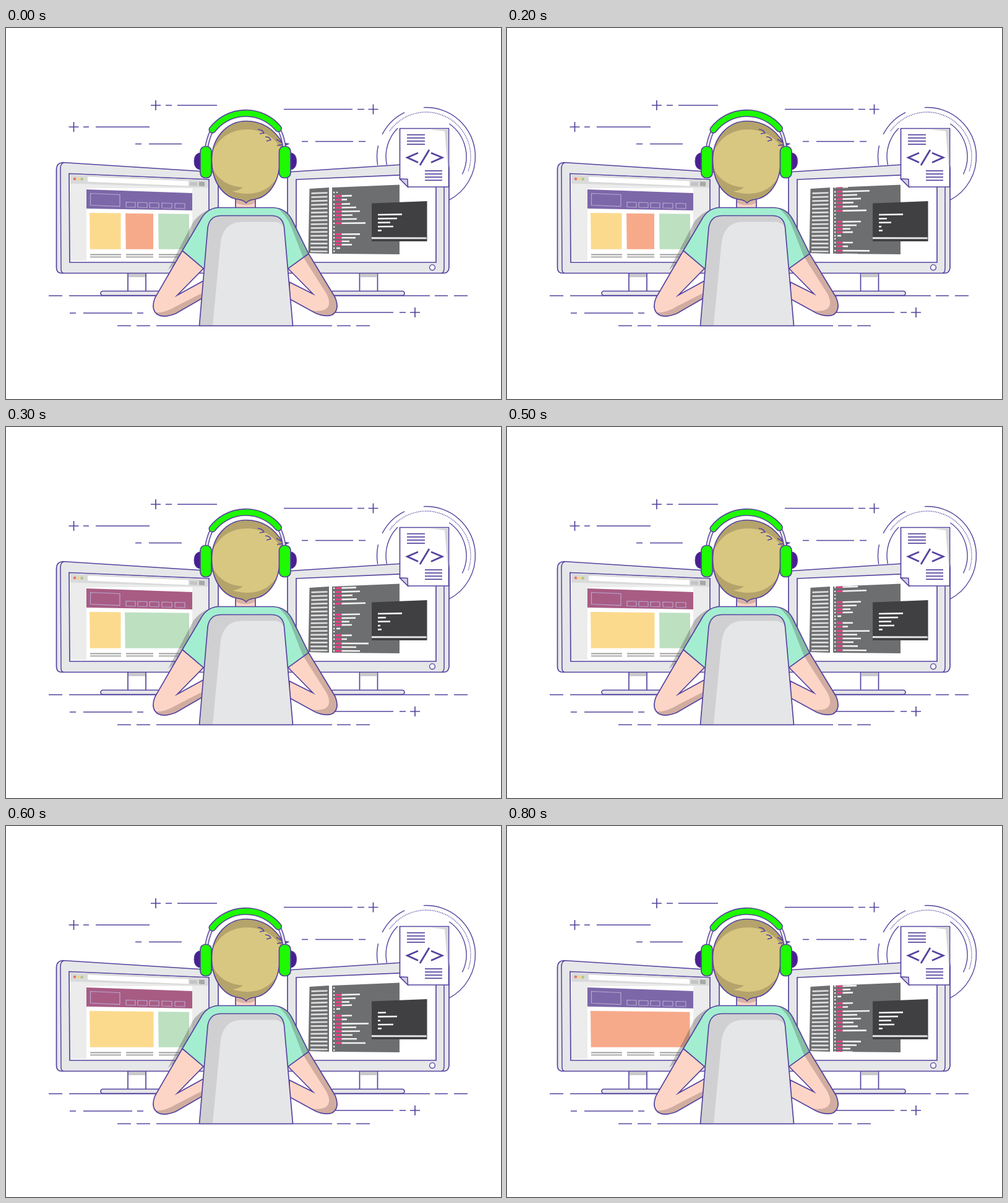
Recreate the animation shown at these times as an HTML page with a canvas. Size 800 by 600 pixels, loop 0.9 s.

```html
<!DOCTYPE html>
<html lang="en">
<head>
<meta charset="utf-8">
<title>Coder at work</title>
<style>
html, body { margin: 0; width: 100%; height: 100%; overflow: hidden; background: #fff; }
canvas { display: block; }
</style>
</head>
<body>
<canvas id="stage" width="800" height="600"></canvas>
<script>
const ctx = document.getElementById('stage').getContext('2d');
const INK = '#56439e', METAL = '#e6e7e9', SKIN = '#fdd5c7', SKIN_DARK = '#d0ada0';
const GREEN = '#1dfa02', PURPLE = '#4b1f91';
const STEP = 100, STEPS = 9;

function shape(d, fill, stroke, width = 1.7) {
  const p = new Path2D(d);
  if (fill) { ctx.fillStyle = fill; ctx.fill(p); }
  if (stroke) { ctx.strokeStyle = stroke; ctx.lineWidth = width; ctx.stroke(p); }
}

function box(x, y, w, h, r, fill, stroke, width = 1.7) {
  ctx.beginPath();
  ctx.roundRect(x, y, w, h, r);
  if (fill) { ctx.fillStyle = fill; ctx.fill(); }
  if (stroke) { ctx.strokeStyle = stroke; ctx.lineWidth = width; ctx.stroke(); }
}

function disc(x, y, r, fill, stroke) {
  box(x - r, y - r, 2 * r, 2 * r, r, fill, stroke, 1.4);
}

// Fills an outline, shades part of it, then strokes it.
function shaded(outline, fill, part, partFill) {
  shape(outline, fill);
  ctx.save();
  ctx.clip(new Path2D(outline));
  shape(part, partFill);
  ctx.restore();
  shape(outline, null, INK);
}

// Horizontal dashes on one level, given as start and end pairs.
function dashes(y, ends, color = INK, width = 1.7) {
  ctx.strokeStyle = color;
  ctx.lineWidth = width;
  ctx.beginPath();
  for (let i = 0; i < ends.length; i += 2) {
    ctx.moveTo(ends[i], y);
    ctx.lineTo(ends[i + 1], y);
  }
  ctx.stroke();
}

function plus(x, y) {
  shape(`M${x - 8} ${y}h16M${x} ${y - 8}v16`, null, INK);
}

function arc(r, from, to, dash = []) {
  ctx.setLineDash(dash);
  ctx.strokeStyle = INK;
  ctx.lineWidth = 1.4;
  ctx.beginPath();
  ctx.arc(679, 208, r, from * Math.PI / 180, to * Math.PI / 180);
  ctx.stroke();
  ctx.setLineDash([]);
}

function backdrop() {
  plus(109.5, 160);
  dashes(160, [125, 134, 145, 232]);
  plus(242, 125);
  dashes(125, [258, 268, 277, 341]);
  dashes(187.5, [209, 219, 231, 284]);
  dashes(131.5, [449, 560, 568, 579]);
  plus(593.5, 131.5);
  dashes(183.5, [478, 488, 500, 561, 570, 581]);
  dashes(433, [69, 91, 102, 245, 530, 685, 693, 714, 724, 746]);
  dashes(461, [103, 113, 125, 204, 212, 222]);
  dashes(460, [530, 626, 636, 646]);
  plus(661, 460);
  dashes(481.5, [180, 202, 211, 233, 243, 527, 535, 557, 566, 588]);
  arc(79.5, -93, 63);
  arc(79.5, 207, 244);
  arc(79.5, 170, 193);
  arc(72, 215, 380, [1.3, 1.5]);
  arc(65, 168, 225);
  arc(65, -55, 26);
}

function stand(x, baseX, baseW) {
  box(x, 390, 29, 36, 0, '#fff', INK);
  box(x + 1, 396, 27, 7, 0, '#c9c9cc');
  box(baseX, 425.5, baseW, 7, 3.5, METAL, INK);
}

const PAGES = [
  [[135, 185.5, '#fcda8d'], [193, 238, '#f7aa8a'], [246, 296, '#bde0c1']],
  [[135, 185.5, '#fcda8d'], [192, 296, '#bde0c1']],
  [[135, 238.5, '#fcda8d'], [246, 296, '#bde0c1']],
  [[135, 295.5, '#f7aa8a']]
];

function leftMonitor(step) {
  stand(197, 153, 100);
  shape('M92 217.5L343 233.500V396.500H89Q82 396 81.5 388V228Q82 218 92 217.5Z', METAL, INK);
  shape('M93 218Q88 219 88 228L89 390Q89 396 93 396.500', null, INK, 1.5);
  shape('M102 235.500L328 245V379H103Z', '#fff', INK);
  shape('M104 237L327 246V376.500H104Z', '#ebeceb');
  shape('M130 259H301V376.500H130Z', '#fff');
  shape('M104 237L327 246V258.500L104 251.500Z', '#d9dada');
  shape('M132 240.500L295 247.500V255.500L132 248.500Z', '#fff');
  shape('M297 249l12 .4v6l-12-.4Z', '#c3c4c4');
  shape('M312 248.500l9 .4v7l-9-.4Z', '#a6a7a7');
  ['#e87372', '#f7d67f', '#b2c77c'].forEach((c, i) => disc(111 + i * 5.8, 244 + i * .2, 2.3, c));

  const page = Math.floor((step - 1) / 2);
  const layout = PAGES[Math.max(0, page)];
  const header = page === 1 || page === 2 ? '#a85c84' : '#7c67a9';
  shape('M130 261L301 267V295L130 292Z', header);
  shape('M136.500 267.500L184 269.500V288.500L136.500 286.500Z', null, '#b9a7d0', 1.2);
  [194, 213, 232, 252, 273].forEach((x, i) => {
    const w = i < 3 ? 15 : 16;
    shape(`M${x} ${281.500 + i * .5}l${w} .5v8l${-w} -.5Z`, null, '#b9a7d0', 1.2);
  });
  for (const [a, b, color] of layout) {
    const top = x => 299 + (x - 135) * .011;
    shape(`M${a} ${top(a)}L${b} ${top(b)}V357.800H${a + .7}Z`, color);
  }
  for (const y of [366.5, 370.3]) dashes(y, [136, 186, 194, 238, 247, 296], '#a09fa0', 1.8);
}

// One code row: y and right end; 0 marks an empty row.
const CODE = [
  [266, 0], [272, 559], [278, 551], [285, 586], [290.8, 566], [297, 572],
  [303, 560], [309.2, 567], [315.9, 581], [321.7, 0], [327.5, 0], [333.5, 572],
  [339.3, 565], [345, 555], [350.3, 559], [356, 540]
];
const CODE_PERIOD = 95;

// Rows tilt upwards at the top of the screen and level out below.
function tilt(y) {
  return -.035 + (y - 256) * .0004;
}

function bar(x, end, y, origin, height, color) {
  const at = px => y + (px - origin) * tilt(y);
  shape(`M${x} ${at(x)}L${end} ${at(end)}`, null, color, height);
}

function codeRow(y, end, bare) {
  const white = '#f2f2f2';
  bar(529, 531.3, y, 529, 2.4, white);
  if (!end) return;
  if (!bare) bar(533, 542, y, 529, 2.9, '#ed3e88');
  bar(bare ? 534 : 542.5, end, y, 529, 2.6, white);
}

function codePanel(step) {
  const panel = 'M527 258L636 253.500V366L527 365Z';
  shape(panel, '#6d6e70');
  ctx.save();
  ctx.clip(new Path2D(panel));
  for (let copy = 0; copy < 2; copy++) {
    CODE.forEach(([y, end], i) => {
      const typing = step === 0 && copy === 0 && i === 3;
      codeRow(y + copy * CODE_PERIOD - step * 10, typing ? 556 : end, i === 15);
    });
  }
  if (step === 0) box(534, 264.7, 2, 2.4, 0, '#f2f2f2');
  ctx.restore();
}

const SHELL = {
  full: [640, 632, 621, 626, 607],
  early: [640, 614, 621, 605, 607],
  late: [614, 632, 605, 626, 607]
};

function terminal(step) {
  shape('M591 283.500L680.500 280V345L591 345Z', '#404042');
  shape('M591 338.300L679.500 338.500V341.200H591Z', '#e9e9e9');
  const pair = Math.floor(step / 2);
  const rows = pair === 1 ? SHELL.early : pair === 3 ? SHELL.late : SHELL.full;
  rows.forEach((end, i) => bar(601, end, 302 + i * 6.4, 601, 2.6, '#f2f2f2'));
}

function rightMonitor(step) {
  stand(571.5, 525, 119);
  shape('M455 233L708 216.500Q716 217 716 228V388Q715 396 708 396.500H455Z', METAL, INK);
  shape('M708 217V388Q708 396 704 396.500', null, INK, 1.5);
  shape('M469 245L695 235.500V379H469Z', '#fff', INK);
  disc(689, 387.3, 4.4, '#fff', INK);
  shape('M490.500 260L522 258V365L488.500 364Z', '#6d6e70');
  for (let i = 0; i < 16; i++) {
    bar(493.5 - i * .1, 519.5, 267.3 + i * 6.25, 493, 2.7, '#dedede');
  }
  codePanel(step);
  terminal(step);
}

function documentIcon() {
  shape('M636.500 162.500H715.500V257H650L636.500 244Z', '#fff', INK);
  shape('M681 163.400H714.700V235L709 167Z', '#d7d7da');
  shape('M636.500 244L649 244.500L649.500 257Z', '#d5cfe3', INK, 1.5);
  for (let i = 0; i < 4; i++) {
    dashes(172.7 + i * 5.1, [648, 677]);
    dashes(231 + i * 5.1, [677, 705]);
  }
  shape('M666 202L648.500 209.500L666 217.500M684 197L669 222M687 202L705 209.500L687 217.500', null, INK, 2.8);
}

function arms() {
  shape('M342 289Q316 296 303 313L262 391L276 380L304 352Z', 'rgba(85,85,85,.36)');
  shaded('M285 360L241 436Q233 456 246 464Q256 469 274 462L319 436V409L277 432L320 388Z', SKIN,
    'M238 460Q256 462 275 450L320 427V470H240Z', SKIN_DARK);
  shaded('M489 365L532 436Q540 456 527 464Q516 468 500 461L458 438V411L496 430L455 388Z', SKIN,
    'M480 370L518 430Q528 450 514 456Q505 459 494 457L520 472L545 460L530 400L489 360Z', SKIN_DARK);
}

function body() {
  box(371, 268, 32, 26, 0, SKIN, INK);
  shape('M372 276H402V283Q388 290 372 283Z', '#d9b3a5');
  shaded('M342 290.500H432Q453 292 462 310L489 365L456 389H319L285 360L314 311Q324 292 342 290.500Z', '#a3eed0',
    'M436 289Q453 301 461 322L481 373L492 366L462 306L440 289Z', '#86bfa6');
  shaded('M312.500 481.500L326 323Q329 304 347 303.500H430Q447 304 449.500 322L463.500 481.500Z', '#d0d0d2',
    'M334 481L346.500 350Q350 314 381 313.500H433Q449 314 451 330L466 481Z', '#e5e6e8');
}

function head() {
  shaded('M388 150.500C357 150.500 332.500 178 332.500 213C332.500 249 351 273 374 277Q384 278 388 283' +
    'Q392 278 402 277C425 273 442.500 249 442.500 213L445 193L456 187.500L447 186C436 168 418 150.500 388 150.500Z',
    '#b4a36b',
    'M332 204C344 176 364 164 391 164C417 165 436 178 446 198L442 236Q424 269 388 268' +
    'Q374 267 366 264Q377 263 383 257.500C359 257 339 243 332 222Z', '#d8c781');
  shape('M407 164Q414 164 417 170L410 171M419 176Q426 176 428 181L421 183M437 180L447 186M438 190L455 187.500', null, INK, 1.5);
}

function headphones() {
  const wires = 'M332 167Q326 180 324 194M442 165Q448 178 450 194';
  shape(wires, null, INK, 6);
  shape(wires, null, '#e9e7ee', 3);

  const band = 'M333.500 164.500A68 68 0 0 1 440 162.500';
  ctx.lineCap = 'round';
  shape(band, null, INK, 12);
  shape(band, null, GREEN, 8.8);
  ctx.lineCap = 'butt';

  shape('M316 201.500Q304 202 304 215.500Q304 229 316 229.500Z', PURPLE, INK, 1);
  shape('M458 201.500Q469.500 202 469.500 215.500Q469.500 229 458 229.500Z', PURPLE, INK, 1);
  box(314, 191.5, 18, 51, 8, GREEN, INK);
  box(441.5, 191.5, 18.5, 51, 8, GREEN, INK);
}

function draw(step) {
  ctx.fillStyle = '#fff';
  ctx.fillRect(0, 0, 800, 600);
  backdrop();
  leftMonitor(step);
  rightMonitor(step);
  documentIcon();
  arms();
  body();
  head();
  headphones();
}

const start = performance.now();
function tick() {
  const elapsed = performance.now() - start;
  draw(Math.floor(elapsed / STEP) % STEPS);
  requestAnimationFrame(tick);
}
tick();
</script>
</body>
</html>
```
